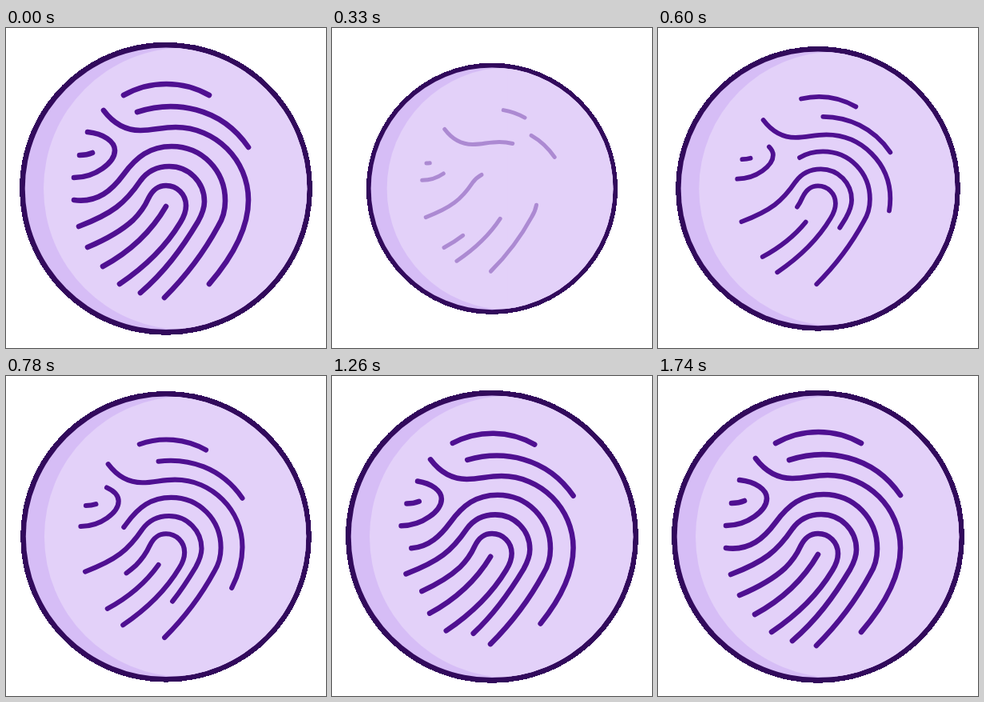
Animation, 400 px wide and 400 px high, one loop 3.8 s. Source, as an HTML page:

```html
<!DOCTYPE html>
<html lang="en">
<head>
<meta charset="utf-8">
<title>Fingerprint</title>
<style>
  html, body { margin: 0; width: 100%; height: 100%; overflow: hidden; background: #fff; }
  svg { display: block; width: 100%; height: 100%; }
  #lines { fill: none; stroke: #4f1091; stroke-width: 6.6; stroke-linecap: round; }
</style>
</head>
<body>
<svg viewBox="0 0 400 400">
  <clipPath id="disc"><circle cx="200" cy="200.8" r="176.3"/></clipPath>
  <g id="badge">
    <circle cx="200" cy="200.8" r="183" fill="#320a5c" shape-rendering="crispEdges"/>
    <circle cx="200" cy="200.8" r="176.3" fill="#d6bdf6"/>
    <g clip-path="url(#disc)" fill="#e3d1f9">
      <circle cx="223.3" cy="200.8" r="176.3"/>
      <rect x="223" y="20" width="170" height="361"/>
    </g>
  </g>
  <g id="lines">
    <path d="M147 84A109 109 0 0 1 254 84"/>
    <path d="M164 105C210 90 268 98 303 149"/>
    <path d="M254 320C285 284 303 250 303 215C303 165 262 124 212 124C194 124 185 128 168 128C148 128 134 119 122 103"/>
    <path d="M102 130C122 132 136 142 136 153C136 168 112 187 85 187"/>
    <path d="M108 156Q101 159 92 159"/>
    <path d="M85 215C115 219 133 202 147 183C163 161 180 148 207 148C245 148 274 178 274 216C274 228 272 237 265 248C246 283 225 310 198 337"/>
    <path d="M168 331C198 305 219 277 240 242C245 233 248 226 248 217C248 193 229 173 204 173C188 173 176 180 168 191C149 219 133 232 91 248"/>
    <path d="M102 274C128 263 146 252 159 240C170 229 174 222 178 213C183 203 189 197 200 197C214 197 225 208 225 222C225 229 223 235 218 243C200 273 176 297 142 320"/>
    <path d="M200 223C182 254 158 278 121 298"/>
  </g>
</svg>
<script>
const LOOP = 3800, STEP = 30, END = 1740, TURN = 250;
const badge = document.getElementById('badge');
const lines = document.getElementById('lines');
const paths = [...lines.children];
paths.forEach(path => path.setAttribute('pathLength', 1));

const clamp = x => Math.min(1, Math.max(0, x));

function bezier(x1, y1, x2, y2) {
  const curve = (a, b, u) => 3 * (1 - u) * (1 - u) * u * a + 3 * (1 - u) * u * u * b + u ** 3;
  return x => {
    if (x <= 0 || x >= 1) return clamp(x);
    let low = 0, high = 1;
    for (let i = 0; i < 24; i++) {
      const mid = (low + high) / 2;
      if (curve(x1, x2, mid) < x) low = mid; else high = mid;
    }
    return curve(y1, y2, low);
  };
}

const easeBoth = bezier(1 / 3, 0, 2 / 3, 1);
const easeScale = bezier(0.18, 0, 0.1, 1);
const easeTrim = bezier(0.05, 0.4, 0.1, 1);

function setScale(node, scale) {
  node.setAttribute('transform', `translate(200 200.6) scale(${scale}) translate(-200 -200.6)`);
}

function draw(time) {
  const leaving = time < TURN;
  const out = easeBoth(clamp(time / TURN));
  const back = duration => clamp((time - TURN) / duration);
  const dip = duration => leaving ? out : 1 - easeScale(back(duration));

  setScale(badge, 1 - 0.17 * dip(730));
  setScale(lines, 1 - 0.25 * dip(1500));

  // Lines retract to their start, then grow back from their far end.
  const visible = leaving ? 1 - out : easeTrim(back(1500));
  lines.style.opacity = leaving ? 1 : back(220);
  lines.style.visibility = visible > 0 ? 'visible' : 'hidden';
  for (const path of paths) {
    path.style.strokeDasharray = `${visible} 2`;
    path.style.strokeDashoffset = leaving ? 0 : visible - 1;
  }
}

function tick() {
  const time = performance.now() % LOOP;
  draw(time >= END ? 0 : Math.floor(time / STEP) * STEP);
  requestAnimationFrame(tick);
}
tick();
</script>
</body>
</html>
```
